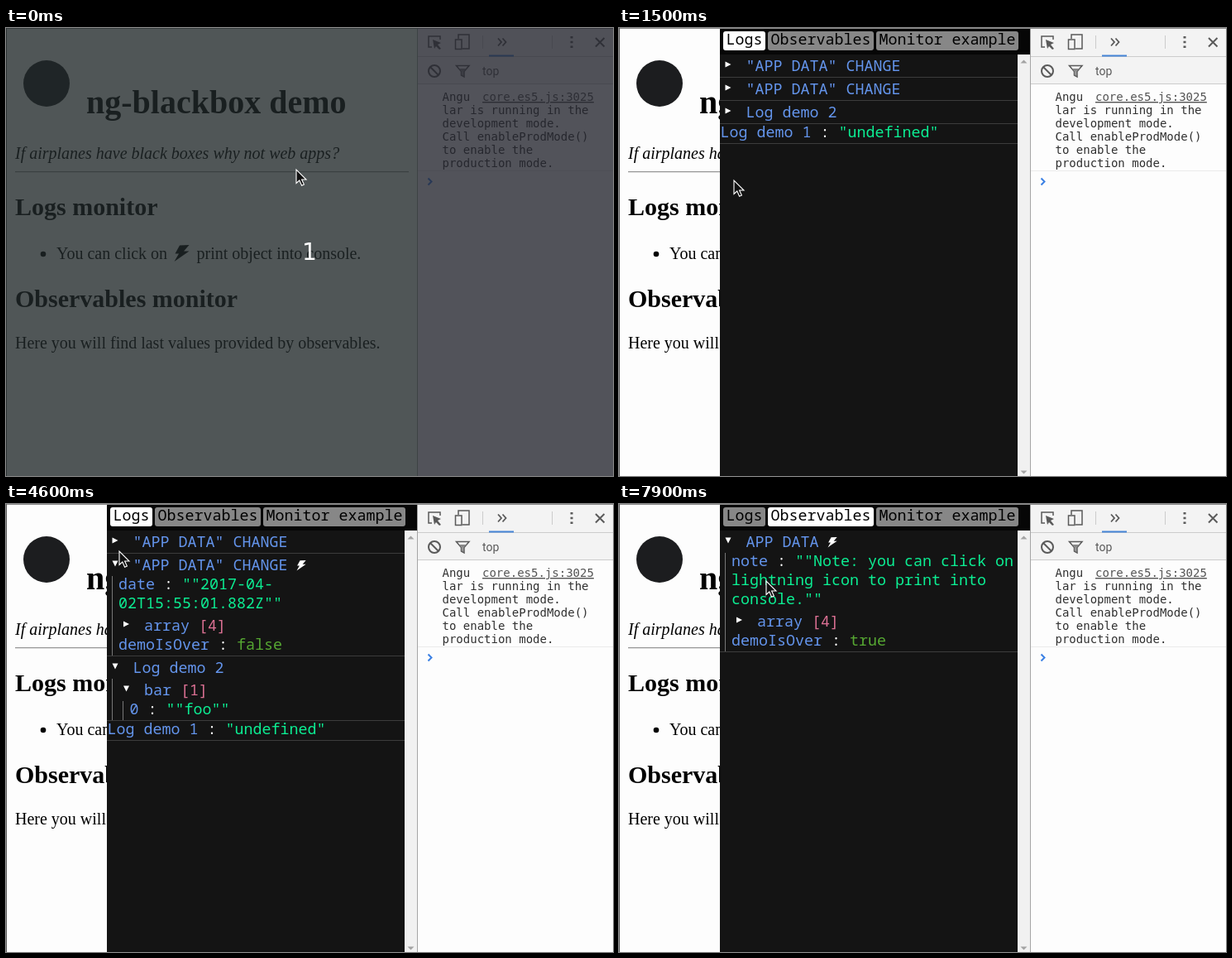
Write an HTML page that moves like this. It is 734 by 541 pixels and loops after 8 s.

```html
<!DOCTYPE html>
<html lang="en">
<head>
<meta charset="utf-8">
<title>ng-blackbox demo</title>
<style>
  html, body { margin: 0; width: 100%; height: 100%; overflow: hidden; background: #fdfdfd; }
  svg { display: block; width: 734px; height: 541px; }
  text { white-space: pre; }
  .page { font: 20px "Liberation Serif", serif; }
  .page .h1 { font-size: 40px; font-weight: bold; }
  .page .h2 { font-size: 30px; font-weight: bold; }
  .console { font: 14px "DejaVu Sans Mono", monospace; fill: #303030; }
  .icons { fill: none; stroke: #5a5a5a; stroke-width: 2; }
  #panel { font: 18.33px "Noto Sans Mono", monospace; }
</style>
</head>
<body>
<svg viewBox="0 0 734 541">
  <defs>
    <path id="bolt" d="M6.500 .5L18 0 11.500 7.500H18L0 20 5.500 10.500H1Z"/>
  </defs>
  <rect width="734" height="541" fill="#fdfdfd"/>

  <g class="page">
    <circle cx="49" cy="67" r="28" fill="#1c1d1f"/>
    <text class="h1" x="97" y="103">ng-blackbox demo</text>
    <text x="11" y="158" font-style="italic">If airplanes have black boxes why not web apps?</text>
    <path d="M11 173.500H487" stroke="#959595"/>
    <path d="M11 174.500H487" stroke="#e4e4e4"/>
    <text class="h2" x="11" y="226">Logs monitor</text>
    <circle cx="45" cy="273" r="3.300"/>
    <text x="61" y="279">You can click on</text>
    <use href="#bolt" x="203.500" y="262"/>
    <text x="230.500" y="279">print object into console.</text>
    <text class="h2" x="11" y="337">Observables monitor</text>
    <text x="11" y="387">Here you will find last values provided by observables.</text>
  </g>

  <g id="panel"></g>

  <rect x="498" width="236" height="68" fill="#f3f3f3"/>
  <path d="M498 34.500H734M498 67.500H734M576.500 9V25M660.500 9V25" stroke="#ccc"/>
  <path d="M498 172.500H734" stroke="#ebebeb"/>
  <path d="M497.500 0V541" stroke="#a5a5a5"/>
  <path d="M584 33.500H614" stroke="#4584d6" stroke-width="2"/>
  <g class="icons">
    <path d="M525 14V10H511V23H515" stroke-width="1.500"/>
    <path d="M516 14L526 18 522 20 526 25 524 26 520 22 518 25Z" fill="#5a5a5a" stroke="none"/>
    <path d="M547 13V8H560V25H552M543.500 14H551V25.500H543.500Z" stroke-width="1.500"/>
    <path d="M595 12.500L599 17 595 21.500M600.500 12.500L604.500 17 600.500 21.500" stroke-width="1.800"/>
    <path d="M684 10V12.500M684 15.700V18.200M684 21.500V24" stroke-width="3"/>
    <path d="M713 12L723.500 22.500M723.500 12L713 22.500"/>
    <circle cx="518" cy="52" r="7"/>
    <path d="M513 47L523 57"/>
    <path d="M544.500 45.500H560L554 52.500V59L550.500 57V52.500Z" stroke-width="1.500"/>
    <path d="M548 49H557L553 52.500V57H551.500V52.500Z" fill="#888" stroke="none"/>
    <path d="M510.500 181.500L514.500 185.500 510.500 189.500" stroke="#3b80e4"/>
  </g>
  <text x="576" y="57" font-family="Roboto, sans-serif" font-size="14" fill="#5a5a5a">top</text>
  <g class="console">
    <text x="576" y="88" fill="#545454" text-decoration="underline">core.es5.js:3025</text>
    <text x="527.500" y="88">Angu</text>
    <text x="527.500" y="104">lar is running in the</text>
    <text x="527.500" y="120">development mode.</text>
    <text x="527.500" y="136">Call enableProdMode()</text>
    <text x="527.500" y="152">to enable the</text>
    <text x="527.500" y="168">production mode.</text>
  </g>
  <path d="M0 .5H734" stroke="#8a8a8a"/>
  <path d="M.5 0V541" stroke="#5c5c5c"/>

  <g id="countdown">
    <rect width="498" height="541" fill="rgb(33,40,41)" opacity=".78"/>
    <rect x="498" width="236" height="541" fill="rgb(35,36,46)" opacity=".78"/>
    <text x="367" y="280" text-anchor="middle" font-family="DejaVu Sans, sans-serif" font-size="28" fill="#fff">1</text>
  </g>
  <path id="cursor" d="M0 0V16.500L3.800 13 6.600 19.300 9.400 18 6.600 12H12Z" fill="#111" stroke="#fff" stroke-width="1.100"/>
</svg>

<script>
const LOOP = 8000, STEP = 100;
const BLUE = '#6495ed', GREEN = '#0cee93', PINK = '#db7093', BOOL = '#56a832', WHITE = '#fff';
const LEFT = 122.5, RIGHT = 482;

// Moments when something opens or switches, in ms
const AT = { panel: 600, demo2: 2400, bar: 3400, second: 4300, first: 4700, tab: 6500, data: 7300 };

// time, x, y of the pointer tip
const POINTER = [
  [0, 351, 171], [100, 352, 172], [900, 352, 172], [1300, 164, 190], [1400, 164, 190],
  [1500, 139, 184], [1900, 133, 102], [2900, 132, 100], [3300, 145, 127], [3500, 151, 128],
  [3800, 151, 128], [4300, 132, 72], [4600, 137, 57], [4700, 132, 45], [5600, 132, 45],
  [6100, 204, 32], [6400, 215, 14], [6600, 215, 14], [7200, 131, 44], [7400, 131, 44], [7900, 178, 93]
];

const $ = id => document.getElementById(id);
const clamp = v => Math.max(0, Math.min(1, v));

function pointerAt(t) {
  let i = 0;
  while (i < POINTER.length - 2 && t >= POINTER[i + 1][0]) i++;
  const [t0, x0, y0] = POINTER[i], [t1, x1, y1] = POINTER[i + 1];
  const p = clamp((t - t0) / (t1 - t0)), k = p * p * (3 - 2 * p);
  return [x0 + (x1 - x0) * k, y0 + (y1 - y0) * k];
}

const rect = (x, y, w, h, fill, r = 0) =>
  `<rect x="${x}" y="${y}" width="${w}" height="${h}" rx="${r}" fill="${fill}"/>`;
const shape = (d, fill) => `<path d="${d}" fill="${fill}"/>`;
const text = (x, y, parts) => `<text x="${x}" y="${y}">` +
  parts.map(([fill, s]) => `<tspan fill="${fill}">${s}</tspan>`).join('') + '</text>';

// Tree nodes: a leaf has lines of coloured parts, a branch has a label and children
const leaf = (key, fill, first, ...more) =>
  ({ lines: [[[BLUE, key], [WHITE, ' : '], [fill, first]], ...more.map(s => [[fill, s]])] });
const branch = (label, count, openAt, hover, ...children) =>
  ({ label, count, openAt, hover, children });

const array = branch('array', ' [4]', Infinity, null);
const note = leaf('note', GREEN, '""Note: you can click on', 'lightning icon to print into', 'console.""');
const over = value => leaf('demoIsOver', BOOL, value);

const LOGS = [
  branch('"APP DATA" CHANGE', '', AT.first, [4700, 6000], note, array, over('true')),
  branch('"APP DATA" CHANGE', '', AT.second, [4000, 5000],
    leaf('date', GREEN, '""2017-04-', '02T15:55:01.882Z""'), array, over('false')),
  branch('Log demo 2', '', AT.demo2, [1800, 4200],
    branch('bar', ' [1]', AT.bar, [3300, 4100], leaf('0', GREEN, '""foo""'))),
  leaf('Log demo 1', GREEN, '"undefined"')
];
const OBSERVABLES = [branch('APP DATA', '', AT.data, [6900, 9000], note, array, over('true'))];

// Returns the markup of a node and the y where it ends
function drawNode(node, depth, y, t) {
  const x = LEFT + 13.5 * depth;
  if (node.lines) {
    const html = node.lines.map((parts, i) => text(x, y + 16 + 23 * i, parts)).join('');
    return [html, y + 23 * node.lines.length];
  }
  const { label, count, openAt, hover, children } = node;
  const open = t >= openAt, base = y + 20, mx = x + 6, my = base - 11.5;
  let html = text(x + 31, base, [[BLUE, label], [PINK, count]]) +
    shape(open ? `M${mx} ${my}h7l-3.500 7z` : `M${mx} ${my}v7l7 -3.500z`, WHITE);
  if (hover) {
    const alpha = clamp(Math.min(t - hover[0], hover[1] - t) / 400);
    const bx = x + 31 + 11 * (label.length + count.length + 1);
    html += `<use href="#bolt" fill="#fff" opacity="${alpha}" transform="translate(${bx} ${base - 12}) scale(.62)"/>`;
  }
  y += 27;
  if (open) {
    const top = y;
    for (const child of children) {
      const [part, end] = drawNode(child, depth + 1, y, t);
      html += part;
      y = end;
    }
    html += rect(Math.round(x + 5.4), top, 1, y - top, '#777');
  }
  return [html, y];
}

function drawPanel(t) {
  if (t < AT.panel) return '';
  const active = t < AT.tab ? 'Logs' : 'Observables';
  let html = rect(122, 1, 375, 540, '#141414') + rect(122, 1, 375, 31, '#060606') +
    rect(RIGHT, 32, 15, 509, '#f1f1f1') +
    shape('M485.500 42.500h8l-4 -4zM485.500 534.500h8l-4 4z', '#a3a3a3');
  for (const [name, x, w] of [['Logs', 126, 51], ['Observables', 180, 128], ['Monitor example', 311, 172]])
    html += rect(x, 4, w, 23, name === active ? WHITE : '#878787', 3) + text(x + 3.5, 20, [['#000', name]]);
  let y = 32;
  for (const node of t < AT.tab ? LOGS : OBSERVABLES) {
    const [part, end] = drawNode(node, 0, y, t);
    html += part + rect(122, end, 360, 1, '#3c3c3c');
    y = end + 1;
  }
  return html;
}

let shown = -1;
function frame(now) {
  const t = Math.floor(now % LOOP / STEP) * STEP;
  if (t !== shown) {
    shown = t;
    $('panel').innerHTML = drawPanel(t);
    $('countdown').style.display = t < 100 ? '' : 'none';
    $('cursor').setAttribute('transform', `translate(${pointerAt(t)})`);
  }
  requestAnimationFrame(frame);
}
frame(0);
</script>
</body>
</html>
```
